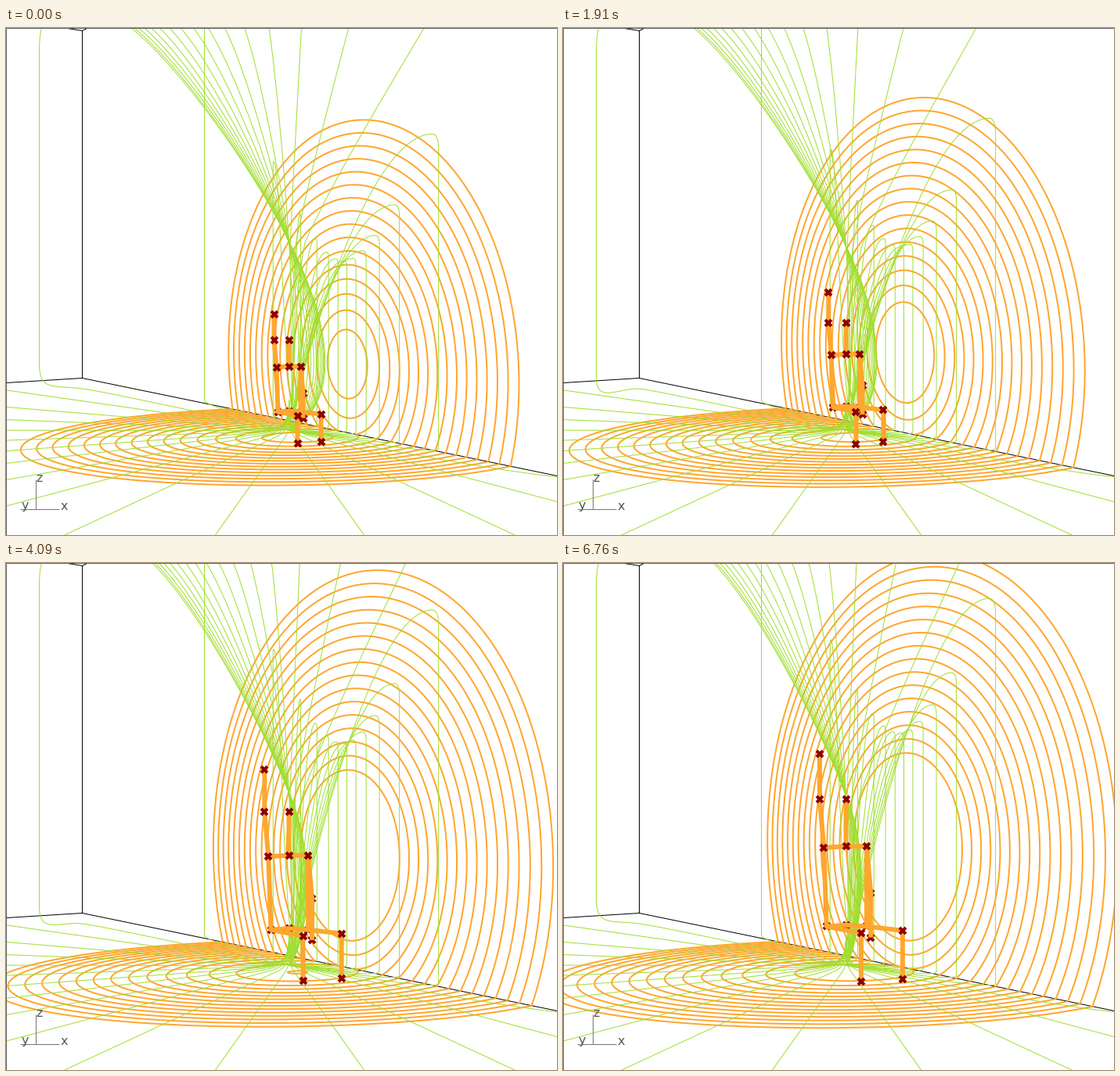
Write a matplotlib script that moves like this. It is 704 by 648 pixels and loops after 8000 ms.

```python
import matplotlib.pyplot as plt
import numpy as np
from matplotlib.animation import FuncAnimation
from matplotlib.collections import PathCollection
from matplotlib.path import Path

W, H, DPI = 704, 648, 100
STEP, LOOP = 50, 8000
STARTS = (500, 2850, 4910)
PX = 72 / DPI

GREEN, ORANGE, RED = "#9fdf2f", "#ffa62e", "#8b0000"

# Each scene: body size, and how far the draught at the far left dips
SCENES = ((1, 0), (1.17, 1), (1.64, 0.6), (1.765, 0))

# Perspective of the room; lengths are pixels at the centre of the wall
HORIZON, FLOOR, DIST = 317, -199.6, 68
KU, KW = 0.000598, 0.000425
AXIS, FEET = 361, 524
BASE = np.array((362, 514))
TURN = np.radians(12.92)  # angle between neighbouring stream lines

# Seated body at size 1: offset from the axis, height above the feet
JOINTS = dict(hand=(-19, 159), elbow=(-19, 126), head=(0, 126),
              shoulder=(-16, 91), neck=(0, 92), shoulder2=(15, 92),
              elbow2=(18, 58), hand2=(18, 26),
              hip=(-14, 34), pelvis=(0, 35), hip2=(15, 34),
              knee=(11, 29), foot=(11, -6), knee2=(41, 31), foot2=(41, -4))
BONES = ("hand elbow shoulder neck shoulder2 elbow2 hand2", "head neck",
         "shoulder hip pelvis hip2 shoulder2", "hip knee foot", "hip2 knee2 foot2")
BEHIND = ("elbow2", "hand2", "hip", "pelvis", "hip2")


def project(u, v, w):
    """u runs along the wall, v up from the horizon, w out from the wall."""
    z = 1 - KU * u - KW * w
    return (435 + 532 * KU * u - 1.085 * w) / z, HORIZON - v / z


def curve(*points):
    return Path(points, [Path.MOVETO] + [Path.CURVE4] * (len(points) - 1))


def line(*points):
    return Path(points)


def circle_part(radius, depth):
    """A circle above the straight edge that lies depth below its centre."""
    cut = np.arcsin(min(1, depth / radius))
    t = np.linspace(-cut, np.pi + cut, 150)
    return radius * np.cos(t), radius * np.sin(t)


def rings(size):
    """Concentric spheres cut by the wall and by the floor."""
    height = 87.6 * size
    paths = []
    for r in 81 + 74 * (size - 1) + 15.75 * np.arange(16):
        u, v = circle_part(np.sqrt(r * r - DIST ** 2), height)
        paths.append(np.column_stack(project(u, FLOOR + height + v, 0)))
        if r > height:
            u, w = circle_part(np.sqrt(r * r - height ** 2), DIST)
            paths.append(np.column_stack(project(u, FLOOR, DIST + w)))
    return [Path(p) for p in paths]


def plume_line(size, i):
    grow = size - 1
    o = (-201 + 3 * i + 0.85 * i * i + 137 * 2.0 ** (i - 15)) * (1 - 0.21 * grow)
    yb = 273 + 32 * grow
    if o < 0:
        neck = AXIS, yb
        upper = (AXIS + 0.66 * o, 0.2 * yb), (AXIS + 0.17 * o, 0.73 * yb)
        lower = (AXIS - 0.18 * o, yb + 66), (AXIS - 0.41 * o * (1 - 0.9 * grow), 470)
    else:
        neck = AXIS + 0.12 * o, yb
        upper = (AXIS + 0.72 * o, 0.3 * yb), (AXIS + 0.35 * o, 0.68 * yb)
        lower = (AXIS + 0.03 * o, yb + 75), (368, 470)
    return curve((AXIS + o, 0), *upper, neck, *lower, BASE)


def wall_lines(size, i):
    """Floor to wall, up the wall, then over the top and down to the body."""
    x, foot = project(85.8 * np.tan(i * TURN), FLOOR, 0)
    peak = 20 + 107 * (1 / np.cos(i * TURN) - 1) + 105 * (size - 1)
    _, top = project(85.8 * np.tan(i * TURN), peak, 0)
    side = x - AXIS
    px = x - 0.042 * side
    corner = 0.09 * abs(side) + 2
    middle = (x + BASE[0]) / 2, 0.6 * foot + 0.4 * BASE[1]
    paths = [line((x, foot - 3), (x, top + corner)),
             curve((x, foot - 4), (x, foot + 4), middle, BASE)]
    if top > 0:
        paths.append(curve(
            (x, top + corner), (x, top + 0.4 * corner), (px + 0.03 * side, top),
            (px, top), (px - 0.41 * side, top),
            (AXIS + 24 * np.tanh(side / 50), 400), (366, 500)))
    return paths


def floor_line(i):
    """Radial line on the floor that bends upwards at the body."""
    a = (i + 0.5) * TURN
    way = np.array((-np.sin(a), 0.157 * np.cos(a) + 0.018 * abs(np.sin(a))))
    near = BASE + 60 * way
    return curve(BASE + 1000 * way, near, near, near, BASE + 15 * way, BASE, (AXIS, 475))


def side_line(dip):
    low = 428 + 18 * dip
    return curve((45, 0), (42, 10), (42, 22), (42, 35),
                 (42, 170), (42, 300), (42, low),
                 (42, 466 + 16 * dip), (62 + 12 * dip, 455 + 2 * dip), (100, 461),
                 (125, 464), (250, 492), BASE)


def stroke(paths, color, width, z):
    return ax.add_collection(PathCollection(
        paths, facecolors="none", edgecolors=color, linewidths=width * PX,
        snap=False, zorder=z))


def build(size, dip):
    flow = [plume_line(size, i) for i in range(16)]
    flow += [floor_line(i) for i in range(-3, 11)] + [side_line(dip)]
    for i in range(-6, 7):
        flow += wall_lines(size, i)
    place = {k: (AXIS + x * size, FEET - y * size) for k, (x, y) in JOINTS.items()}
    bones = [line(*(place[k] for k in b.split())) for b in BONES]
    artists = [stroke(rings(size), ORANGE, 2, 3), stroke(flow, GREEN, 1, 4),
               stroke(bones, ORANGE, 6, 6)]
    for k, (x, y) in place.items():
        artists += ax.plot(x, y, "x", color=RED, ms=8 * PX, mew=4 * PX,
                           zorder=5 if k in BEHIND else 7)
    return artists


def draw_room():
    stroke([line((97, 3), (97, 447)), line((0, 453), (97, 447), (W, 572)),
            line((78, 0), (97, 3), (103, 0))], "black", 1, 2)
    stroke([line((38, 577), (38, 615)), line((18, 615), (68, 615))], "#777777", 1, 8)
    stroke([line((0, 0), (W, 0)), line((0, 0), (0, H))], "#606060", 1, 9)
    for name, x, y in (("z", 38, 579), ("x", 69, 615), ("y", 19, 615)):
        ax.text(x, y, name, color="#555555", fontsize=16 * PX,
                family="DejaVu Sans", va="baseline", zorder=8)


fig = plt.figure(figsize=(W / DPI, H / DPI), dpi=DPI, facecolor="white")
ax = fig.add_axes([0, 0, 1, 1])
ax.axis("off")
draw_room()
scenes = [build(*s) for s in SCENES]
ax.set_xlim(-0.5, W - 0.5)
ax.set_ylim(H - 0.5, -0.5)


def update(n):
    t = n * STEP + STEP / 2
    current = sum(t >= s for s in STARTS)
    for i, artists in enumerate(scenes):
        for a in artists:
            a.set_visible(i == current)
    return scenes[current]


anim = FuncAnimation(fig, update, frames=LOOP // STEP, interval=STEP,
                     repeat=True, repeat_delay=0, blit=False)
plt.show()
```
